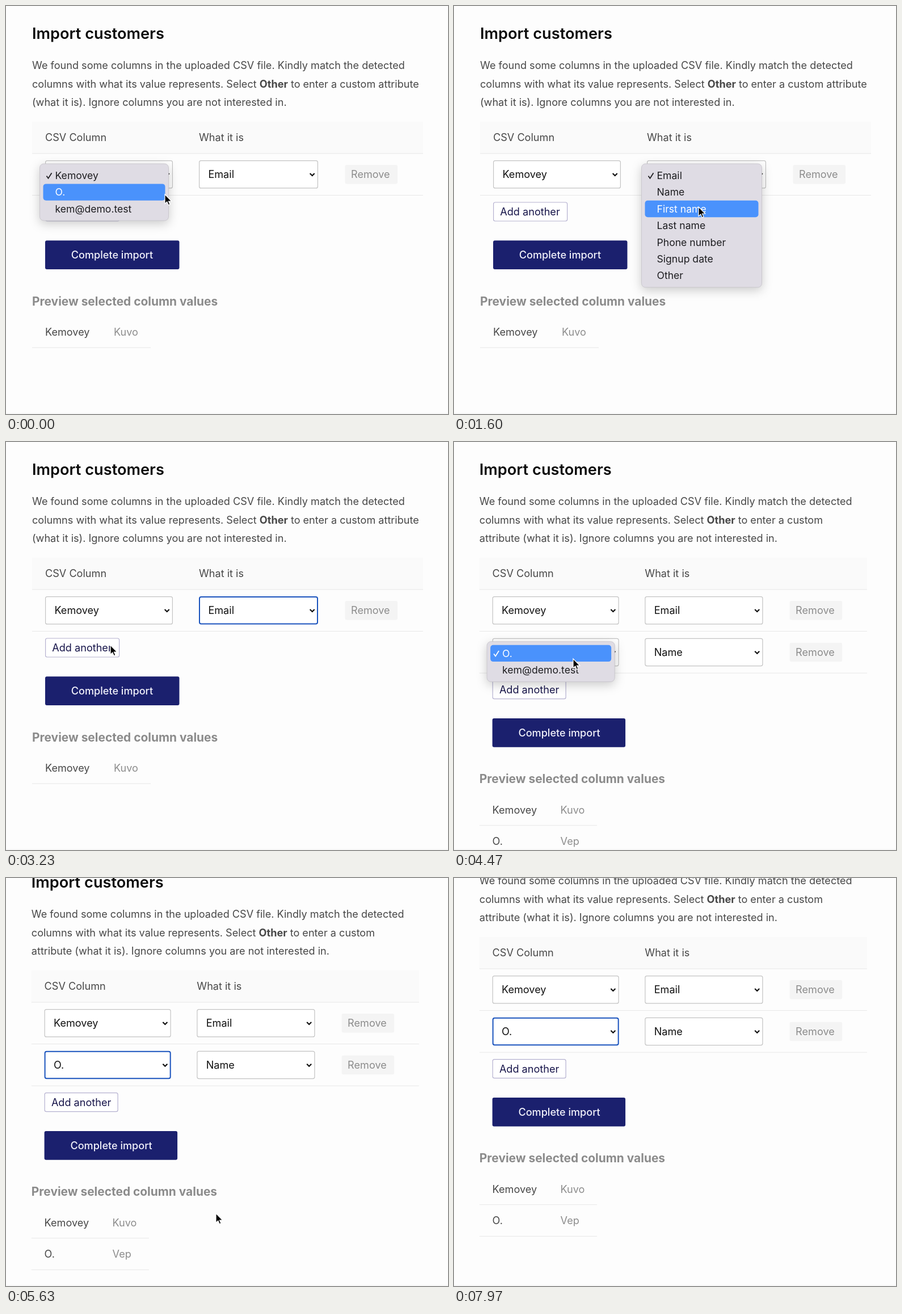
An HTML page for the animation above (8 s loop, 779 by 719 pixels).

```html
<!DOCTYPE html>
<html lang="en">
<head>
<meta charset="utf-8">
<title>Import customers</title>
<style>
  html, body { margin: 0; width: 100%; height: 100%; overflow: hidden; background: #fdfdfd; }
  svg { display: block; width: 779px; height: 719px; }
  text { font: 400 18.1px Inter, "Open Sans", sans-serif; font-optical-sizing: none; fill: #474747; white-space: pre; }
  .title { font-size: 27.2px; font-weight: 600; fill: #0a0a0a; }
  .subtitle { font-size: 20.9px; font-weight: 700; fill: #8b8b8b; }
  .strong { font-weight: 700; }
  .value { fill: #111; }
  .muted { fill: #8c8c8c; }
  .link { fill: #17154a; }
  .primary { font-weight: 500; fill: #f1f1fa; }
  .option { font-size: 17.6px; fill: #1d1d20; }
  .active { fill: #fff; }
  .menu { filter: drop-shadow(0 5px 9px #0003); }
</style>
</head>
<body>
<svg id="stage" viewBox="0 0 779 719"></svg>
<script>
const stage = document.getElementById('stage');
const LOOP = 8000, ITEM = 29.4, ROW = 73.7, SAMPLE_ROW = 55.7;
const COLUMNS = ['Kemovey', 'O.', 'kem@demo.test'];
const KINDS = ['Email', 'Name', 'First name', 'Last name', 'Phone number', 'Signup date', 'Other'];
const SAMPLES = ['Kuvo', 'Vep'];

// Each step ends at its time; the pointer glides there and rests before acting.
const GLIDE = 400, REST = 190;
const steps = {
  start:       { at: 0,    x: 280, y: 332 },
  closeFirst:  { at: 400,  x: 240, y: 300 },
  openKind:    { at: 700,  x: 430, y: 300 },
  hoverKind:   { at: 1790, x: 431, y: 354 },
  scanKinds:   { at: 2300, x: 425, y: 470 },
  closeKind:   { at: 2780, x: 425, y: 305 },
  addRow:      { at: 3420, x: 184, y: 358 },
  openSecond:  { at: 3960, x: 210, y: 382 },
  closeSecond: { at: 5120, x: 210, y: 382 },
  scrollDown:  { at: 5700, x: 370, y: 591 },
  showSample:  { at: 6400, x: 229, y: 525 },
  moveUp:      { at: 7300, x: 185, y: 340 },
  leave:       { at: 7940, x: 128, y: 392 }
};
const sequence = Object.values(steps);

function ease(t, from, to) {
  const p = Math.min(1, Math.max(0, (t - from) / (to - from)));
  return p * p * (3 - 2 * p);
}

function pointerAt(t) {
  const i = Math.max(1, sequence.findIndex(step => step.at > t));
  const a = sequence[i - 1], b = sequence[i], arrival = b.at - REST;
  const p = ease(t, Math.max(a.at, arrival - GLIDE), arrival);
  return [a.x + (b.x - a.x) * p, a.y + (b.y - a.y) * p];
}

const scrollAt = t => 41 * ease(t, 5300, 5600) + 59 * ease(t, 5900, 6250);
const during = (t, from, to) => t >= from.at && t < to.at;

const text = (x, y, content, cls = '') => `<text x="${x}" y="${y}" class="${cls}">${content}</text>`;
const box = (x, y, w, h, fill, r = 0, extra = '') =>
  `<rect x="${x}" y="${y}" width="${w}" height="${h}" rx="${r}" fill="${fill}" ${extra}/>`;
const rule = (x, w, y) => box(x, y - 0.5, w, 1, '#e8e8e8');

function select(x, y, w, label, focused) {
  const border = focused ? 2 : 1.2, inset = border / 2;
  return box(x + inset, y + inset, w - border, 49.5 - border, '#fff', 3,
      `stroke="${focused ? '#1a53bd' : '#c3c3c3'}" stroke-width="${border}"`) +
    text(x + 16.4, y + 31.2, label, 'value') +
    `<path d="M${x + w - 14.3} ${y + 23}l4 4 4-4" fill="none" stroke="#111" stroke-width="2.2"/>`;
}

// A native-looking list laid over the select at x, y; its first option is the chosen one.
function menu(selectX, selectY, selectW, options, [px, py]) {
  const x = selectX - 9.5, y = selectY + 6, w = selectW + 2;
  const hover = px >= x && px <= x + w ? Math.floor((py - y - 6) / ITEM) : -1;
  const items = options.map((label, i) => {
    const top = y + 6 + i * ITEM, active = i === hover;
    const check = `<path d="M${x + 12} ${top + 15.5}l3 4.2 6-9.5" fill="none" stroke="${active ? '#fff' : '#1d1d20'}" stroke-width="1.8"/>`;
    return (active ? box(x + 6, top, w - 12, ITEM, '#4a92fc', 5) : '') +
      (i === 0 ? check : '') +
      text(x + 27, top + 21, label, active ? 'option active' : 'option');
  });
  const panel = box(x, y, w, options.length * ITEM + 12, '#dfdce4', 7, 'stroke="#c4c2c8" stroke-width=".8"');
  return `<g class="menu">${panel}</g>${items.join('')}`;
}

function scene(t) {
  const pointer = pointerAt(t), second = t >= steps.addRow.at;
  // The page narrows slightly once the second row brings in a scrollbar.
  const left = second ? 44.8 : 46, scale = second ? 0.9915 : 1, shift = second ? ROW : 0;
  const at = offset => left + offset * scale;
  const x = at(23), kindX = at(294), removeX = at(551.5);
  const width = 689 * scale, columnW = 225 * scale, kindW = 210 * scale;
  const [lineEnd, lineStart] = second ? ['', 'attribute '] : [' attribute', ''];

  const focusedColumn = during(t, steps.closeFirst, steps.openKind) ? 0 : t >= steps.closeSecond.at ? 1 : -1;
  const focusedKind = during(t, steps.closeKind, steps.addRow) ? 0 : -1;

  let page = text(left, 57.6, 'Import customers', 'title') +
    text(left, 111, 'We found some columns in the uploaded CSV file. Kindly match the detected') +
    text(left, 143.6, `columns with what its value represents. Select <tspan class="strong">Other</tspan> to enter a custom${lineEnd}`) +
    text(left, 175.6, `${lineStart}(what it is). Ignore columns you are not interested in.`) +
    box(left, 204, width, 56, '#fafafa') +
    text(x, 237.8, 'CSV Column') + text(kindX, 237.8, 'What it is') +
    rule(left, width, 260);

  for (let i = 0; i <= +second; i++) {
    const y = 272 + i * ROW, sampleY = 581 + shift + i * SAMPLE_ROW;
    page += select(x, y, columnW, COLUMNS[i], focusedColumn === i) +
      select(kindX, y, kindW, KINDS[i], focusedKind === i) +
      box(removeX, y + 8, 92.5, 33.5, '#f4f4f4', 3) +
      text(removeX + 10.5, y + 31.2, 'Remove', 'muted') +
      rule(left, width, y + 61.5) +
      text(x, sampleY, COLUMNS[i]) + text(at(144), sampleY, SAMPLES[i], 'muted') +
      rule(left, 209 * scale, sampleY + 21);
  }

  page += box(x + 0.6, 346 + shift, 130 * scale, 33, '#fff', 3, 'stroke="#b5b1d0" stroke-width="1.2"') +
    text(x + 12.3, 369 + shift, 'Add another', 'link') +
    box(x, 413.3 + shift, 236.5 * scale, 50.7, '#1b206e', 3) +
    text(x + 45.8, 445 + shift, 'Complete import', 'primary') +
    text(left, 527.6 + shift, 'Preview selected column values', 'subtitle');

  let out = `<g transform="translate(0 ${-scrollAt(t)})">${page}</g>` + box(0, 717, 779, 2, '#f7f7f7');
  if (during(t, steps.start, steps.closeFirst)) out += menu(x, 272, columnW, COLUMNS, pointer);
  if (during(t, steps.openKind, steps.closeKind)) out += menu(kindX, 272, kindW, KINDS, pointer);
  if (during(t, steps.openSecond, steps.closeSecond)) out += menu(x, 272 + ROW, columnW, COLUMNS.slice(1), pointer);
  if (t < steps.leave.at)
    out += `<path transform="translate(${pointer})" d="M0 0V16.5L3.8 13 6.3 18.8 9 17.6 6.5 12H11.8Z" fill="#000" stroke="#fff" stroke-width="1.2"/>`;
  return out;
}

function draw() {
  stage.innerHTML = scene(performance.now() % LOOP);
  requestAnimationFrame(draw);
}
draw();
</script>
</body>
</html>
```
